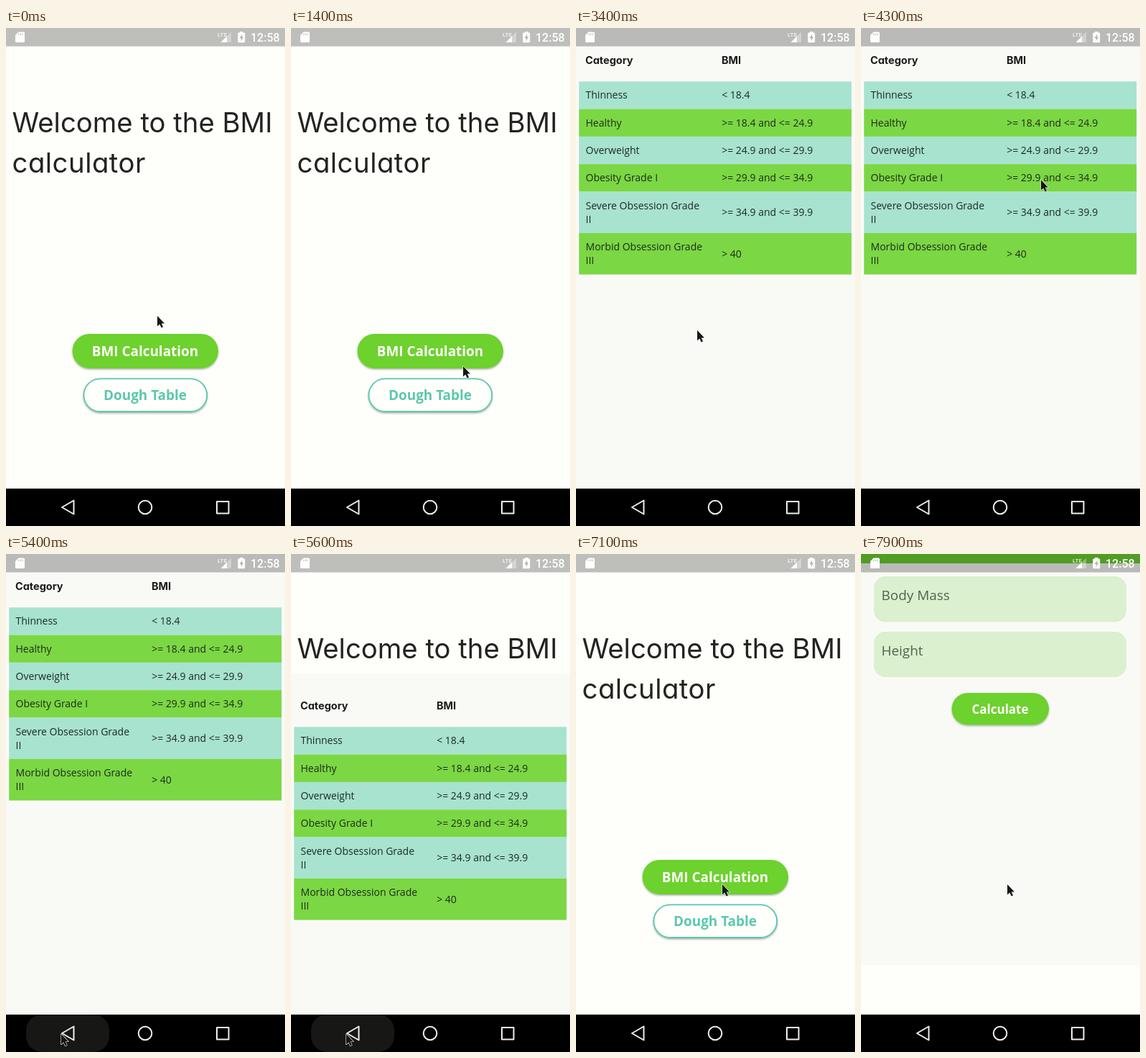
An HTML page for the animation above (8000 ms loop, 389x692 px).

```html
<!DOCTYPE html>
<html lang="en">
<head>
<meta charset="utf-8">
<title>BMI calculator</title>
<style>
  html, body { margin: 0; width: 100%; height: 100%; overflow: hidden; background: #fefffb; }
  svg { display: block; width: 100%; height: 100%; }
  text { font-family: "Open Sans", sans-serif; fill: #1f2a22; white-space: pre; }
  .title { font: 38.3px Inter, sans-serif; font-optical-sizing: none; font-feature-settings: "cv11"; fill: #232420; }
  .head { font: 700 14.5px Inter, sans-serif; font-optical-sizing: none; font-feature-settings: "cv11"; fill: #1c1d1b; }
  .cell { font-size: 14px; }
  .button { font-size: 18.9px; font-weight: 700; text-anchor: middle; fill: #fffffb; }
  .label { font-size: 18.9px; fill: #52614c; }
  .lte { font: 700 8px Roboto, sans-serif; fill: #fff; fill-opacity: .75; }
  .clock { font: 500 16px Roboto, sans-serif; fill: #fff; }
</style>
</head>
<body>
<svg viewBox="0 0 389 692">
  <defs>
    <filter id="lift" x="-10%" y="-20%" width="120%" height="150%">
      <feDropShadow dx="0" dy="1.5" stdDeviation="1.3" flood-color="#000" flood-opacity=".32"/>
    </filter>
  </defs>

  <g id="home">
    <rect width="389" height="640" fill="#fefffb"/>
    <text class="title" x="8.5" y="145">Welcome to the BMI</text>
    <text class="title" x="8.5" y="201" letter-spacing=".5">calculator</text>
    <rect x="92.5" y="425" width="203.5" height="48" rx="24" fill="#6dd12f" filter="url(#lift)"/>
    <text class="button" x="194" y="455.7">BMI Calculation</text>
    <rect x="108.4" y="487.4" width="171.8" height="45.6" rx="22.8" fill="#fffffc" stroke="#5cc8ac" stroke-width="1.9" filter="url(#lift)"/>
    <text class="button" x="194" y="516.6" style="fill:#5cc8ac">Dough Table</text>
  </g>

  <g id="table">
    <rect width="389" height="640" fill="#f9faf6"/>
    <text class="head" x="13" y="50">Category</text>
    <text class="head" x="203" y="50">BMI</text>
  </g>

  <g id="form">
    <rect width="389" height="640" fill="#f9faf6"/>
    <rect width="389" height="82" fill="#6dd12f"/>
    <rect x="18" y="100" width="352" height="63.5" rx="16" fill="#daf0cf"/>
    <text class="label" x="28.5" y="132.8">Body Mass</text>
    <rect x="18" y="177" width="352" height="63" rx="16" fill="#daf0cf"/>
    <text class="label" x="28.5" y="209.6">Height</text>
    <rect x="126.5" y="262" width="135.5" height="44.5" rx="22.2" fill="#6dd12f" filter="url(#lift)"/>
    <text class="button" x="194" y="291.3" style="font-size:17px">Calculate</text>
  </g>

  <g id="status">
    <rect width="389" height="25.5" fill="#000" fill-opacity=".255"/>
    <path d="M17.5 5.5H24.5Q26 5.5 26 7V18.5Q26 20 24.5 20H14.5Q13 20 13 18.5V10Z" fill="#fff"/>
    <path d="M17.8 7.5V10M20.3 7.5V10M22.8 7.5V10" stroke="#bebfbc" stroke-width="1.1"/>
    <text class="lte" x="295" y="12">LTE</text>
    <path d="M299.5 20H314V5.5Z" fill="#fff" fill-opacity=".35"/>
    <path d="M299.5 20H308V11.5Z" fill="#fff"/>
    <path d="M326 5H330.5V6.5H332Q333.2 6.5 333.2 7.7V19Q333.2 20.2 332 20.2H324.5Q323.3 20.2 323.3 19V7.7Q323.3 6.5 324.5 6.5H326Z" fill="#fff"/>
    <path d="M329.2 8.5L325.5 14H327.7V18L331.2 12.5H329.2Z" fill="#b5b6b3"/>
    <text class="clock" x="341" y="18.6">12:58</text>
  </g>

  <g id="nav">
    <rect y="640" width="389" height="52"/>
    <rect id="ripple" x="28" y="640" width="116" height="52" rx="22" fill="#171715"/>
    <g fill="none" stroke="#eee" stroke-width="2" stroke-linejoin="round">
      <path d="M78 666L94.5 656.5V675.5Z"/>
      <circle cx="194" cy="666" r="9.3"/>
      <rect x="294" y="658" width="16.5" height="16.5"/>
    </g>
  </g>

  <path id="cursor" d="M0 0V14.5L3.3 11.5L5.6 16.6L8 15.6L5.8 10.5H10Z" fill="#161616" stroke="#fff" stroke-width="1.1" stroke-linejoin="round" paint-order="stroke"/>
</svg>

<script>
const LOOP = 8000, STEP = 100, PAGE = 640;
const [table, form, ripple, cursor] =
  ['table', 'form', 'ripple', 'cursor'].map(id => document.getElementById(id));

function add(parent, tag, attrs, label) {
  const el = document.createElementNS('http://www.w3.org/2000/svg', tag);
  for (const key in attrs) el.setAttribute(key, attrs[key]);
  if (label) el.textContent = label;
  parent.append(el);
}

const rows = [
  ['Thinness', '< 18.4'],
  ['Healthy', '>= 18.4 and <= 24.9'],
  ['Overweight', '>= 24.9 and <= 29.9'],
  ['Obesity Grade I', '>= 29.9 and <= 34.9'],
  ['Severe Obsession Grade\nII', '>= 34.9 and <= 39.9'],
  ['Morbid Obsession Grade\nIII', '> 40']
];

function addRows() {
  const lead = 19.2;
  let y = 74.3;
  rows.forEach(([name, range], i) => {
    const lines = name.split('\n');
    const height = 19.1 + lead * lines.length;
    const base = y + height / 2 + 5;
    add(table, 'rect', { x: 4.2, y, width: 380, height, fill: i % 2 ? '#7bd743' : '#a7e3cf' });
    lines.forEach((line, n) =>
      add(table, 'text', { class: 'cell', x: 13.5, y: base + (n - (lines.length - 1) / 2) * lead }, line));
    add(table, 'text', { class: 'cell', x: 203.2, y: base }, range);
    y += height;
  });
}

// Pointer path: time, x, y
const path = [
  [600, 211, 400], [900, 115, 438], [1200, 266, 480], [1300, 262, 510], [1400, 240, 470],
  [1500, 236, 454], [1700, 267, 490], [1900, 225, 546], [2000, 178, 525], [2100, 191, 502],
  [3200, 191, 502], [3400, 169, 420], [3700, 223, 253],
  [3800, 223, 253], [4100, 210, 122], [4300, 251, 211], [4700, 113, 612],
  [5100, 77, 667], [5800, 77, 667], [6200, 247, 493],
  [6300, 247, 493], [6600, 267, 440], [6800, 230, 405], [7000, 178, 450], [7100, 204, 459]
];

function pointer(t) {
  const i = path.findIndex(p => p[0] > t);
  if (i === 0) return path[0].slice(1);
  if (i < 0) return path[path.length - 1].slice(1);
  const [t0, x0, y0] = path[i - 1], [t1, x1, y1] = path[i];
  const k = (t - t0) / (t1 - t0);
  return [x0 + (x1 - x0) * k, y0 + (y1 - y0) * k];
}

const slideIn = (t, start, tau) => Math.floor(PAGE * Math.exp(-Math.max(0, t - start) / tau));
const slideOut = (t, start, span) => Math.round(PAGE * Math.min(1, (t - start) / span) ** 3.33);

function show(el, shown) {
  el.style.display = shown ? '' : 'none';
}

function move(el, x, y) {
  el.setAttribute('transform', `translate(${x} ${y})`);
}

function draw(t) {
  const closing = t >= 5400 && t < 5700;
  show(table, t >= 2800 && t < 5700);
  move(table, 0, closing ? slideOut(t, 5400, 300) : slideIn(t, 2700, 28.4));
  show(form, t >= 7700);
  move(form, 0, -slideIn(t, 7600, 134.7));
  show(ripple, closing);
  move(cursor, ...pointer(t));
}

const begin = performance.now();
function frame() {
  const t = (performance.now() - begin) % LOOP;
  draw(Math.floor(t / STEP) * STEP);
  requestAnimationFrame(frame);
}

addRows();
frame();
</script>
</body>
</html>
```
